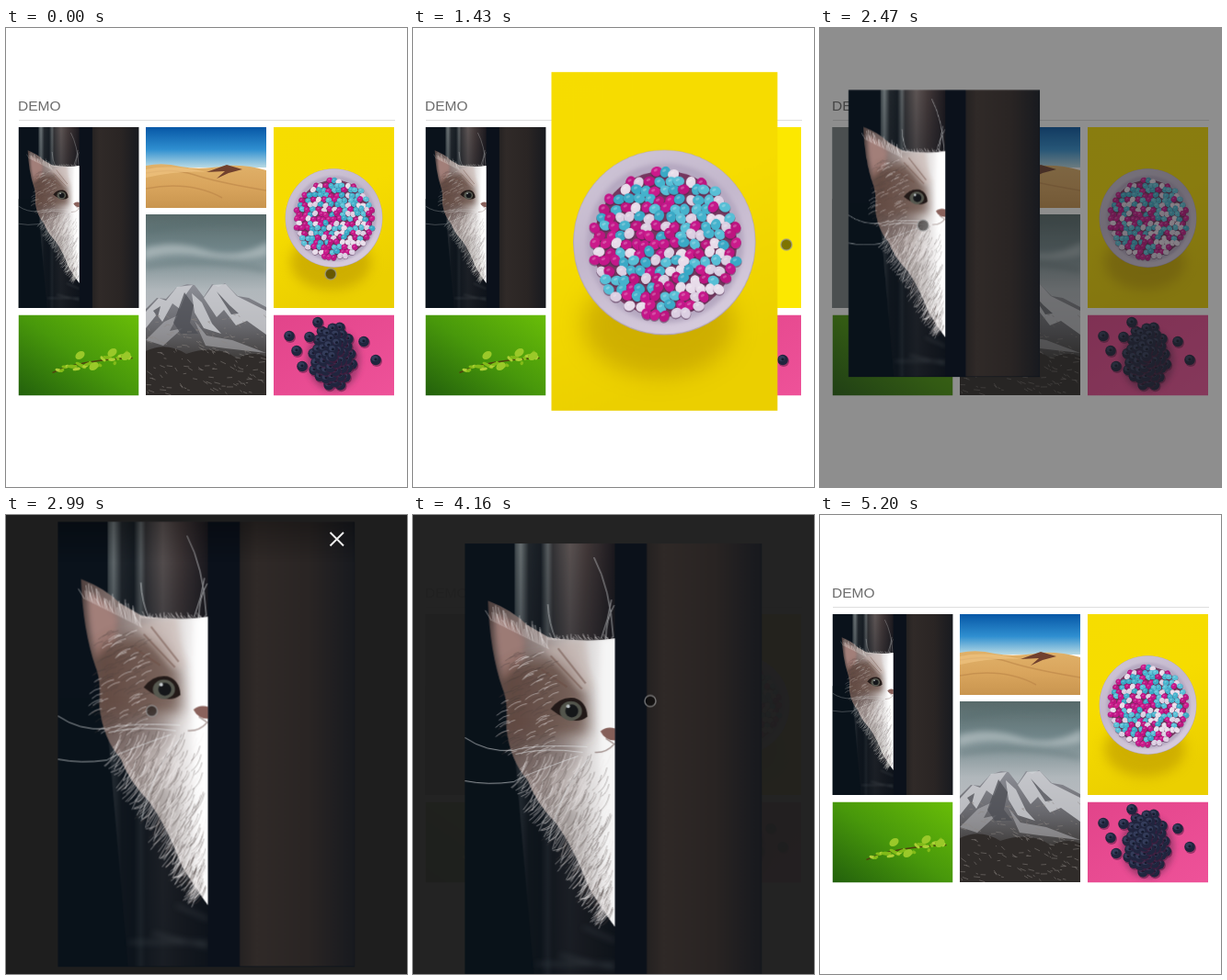
Animation, 436 px wide and 500 px high, one loop 5460 ms. Source, as an HTML page:

```html
<!DOCTYPE html>
<html lang="en">
<head>
<meta charset="utf-8">
<title>Demo gallery</title>
<style>
html, body { margin: 0; width: 100%; height: 100%; overflow: hidden; background: #fff; }
#stage { display: block; width: 436px; height: 500px; }
#stage text { font: 15.5px "Liberation Sans", Arial, sans-serif; fill: #6c6c6c; }

/* One loop is 42 ticks of 130 ms; one tick is 2.381 %. */
.anim { animation: 5460ms step-end infinite both; transform-origin: 56.5px 7.5px; }
.bowl-shown { animation-name: bowl-shown; }
.cat-shown { animation-name: cat-shown; }
.bowl-zoom { animation-name: bowl-zoom; }
.cat-zoom { animation-name: cat-zoom; }
.backdrop { animation-name: backdrop; }
.toolbar { animation-name: toolbar; }
.pointer { animation-name: pointer; transform-origin: 0 0; }

@keyframes bowl-shown { 0% { opacity: 0 } 4.76% { opacity: 1 } 30.95%, 100% { opacity: 0 } }
@keyframes cat-shown { 0% { opacity: 0 } 45.23% { opacity: 1 } 92.85%, 100% { opacity: 0 } }
@keyframes bowl-zoom {
  0% { transform: translate(234.5px, 100.5px) scale(.407) }
  4.76% { transform: translate(141px, 60px) scale(.644) }
  7.14% { transform: translate(35px, 15px) scale(.911) }
  9.52% { transform: none }
  26.19% { transform: translate(94px, 40.5px) scale(.762) }
  28.57% { transform: translate(199px, 85px) scale(.496) }
  30.95%, 100% { transform: translate(234.5px, 100.5px) scale(.407) }
}
@keyframes cat-zoom {
  0% { transform: translate(-43px, 100.5px) scale(.407) }
  45.23% { transform: translate(-25.5px, 60px) scale(.645) }
  47.61% { transform: translate(-7px, 15px) scale(.911) }
  49.99% { transform: translate(0, 0) scale(1) }
  73.8% { transform: translate(0, 0) scale(1); opacity: 1; animation-timing-function: steps(5) }
  85.71% { transform: translate(0, 118px) scale(1); opacity: .82 }
  88.09% { transform: translate(-18px, 111px) scale(.763); opacity: .9 }
  90.47% { transform: translate(-37px, 103px) scale(.496); opacity: 1 }
  92.85%, 100% { transform: translate(-43px, 100.5px) scale(.407); opacity: 1 }
}
@keyframes backdrop {
  0% { opacity: 0 }
  45.23% { opacity: .5 }
  47.61% { opacity: .92 }
  49.99% { opacity: 1 }
  73.8% { opacity: 1; animation-timing-function: steps(5) }
  85.71% { opacity: .88 }
  88.09% { opacity: .5 }
  90.47% { opacity: .15 }
  92.85% { opacity: .03 }
  95.23%, 100% { opacity: 0 }
}
@keyframes toolbar {
  0% { opacity: 0 } 9.52% { opacity: 1 } 26.19% { opacity: 0 }
  49.99% { opacity: 1 } 76.19%, 100% { opacity: 0 }
}
@keyframes pointer {
  0% { transform: translate(353px, 268px); opacity: 1 }
  4.76% { transform: translate(353px, 268px); animation-timing-function: steps(2) }
  9.52% { transform: translate(375px, 252px); animation-timing-function: steps(3) }
  16.66% { transform: translate(406px, 236px) }
  26.19% { transform: translate(406px, 236px); animation-timing-function: steps(6) }
  40.47% { transform: translate(112px, 215px) }
  47.61% { transform: translate(112px, 215px); animation-timing-function: steps(8) }
  66.66% { transform: translate(236px, 211px); animation-timing-function: steps(2) }
  71.42% { transform: translate(258px, 179px) }
  73.8% { transform: translate(258px, 179px); animation-timing-function: steps(5) }
  85.71% { transform: translate(258px, 297px); opacity: 1 }
  95.23%, 100% { transform: translate(258px, 297px); opacity: 0 }
}
</style>
</head>
<body>
<svg id="stage" viewBox="0 0 436 500" width="436" height="500">
  <defs>
    <filter id="mist" x="-30%" y="-60%" width="160%" height="220%"><feGaussianBlur stdDeviation="3"/></filter>
    <filter id="soft" x="-40%" y="-40%" width="180%" height="180%"><feGaussianBlur stdDeviation="8"/></filter>
    <filter id="softer" x="-40%" y="-60%" width="180%" height="220%"><feGaussianBlur stdDeviation="16"/></filter>
    <linearGradient id="yellow" x2=".3" y2="1">
      <stop stop-color="#f6dd00"/><stop offset=".5" stop-color="#f6dc00"/><stop offset="1" stop-color="#ebcf00"/>
    </linearGradient>
    <linearGradient id="china" x2=".5" y2="1">
      <stop stop-color="#d0c7d8"/><stop offset=".5" stop-color="#c4b8cd"/><stop offset="1" stop-color="#d5cadc"/>
    </linearGradient>
    <linearGradient id="door">
      <stop stop-color="#252222"/><stop offset=".15" stop-color="#302a28"/>
      <stop offset=".6" stop-color="#2a2524"/><stop offset="1" stop-color="#181a1f"/>
    </linearGradient>
    <linearGradient id="frame">
      <stop stop-color="#454e52"/><stop offset=".06" stop-color="#7c8486"/><stop offset=".14" stop-color="#262b30"/>
      <stop offset=".26" stop-color="#1a2026"/><stop offset=".33" stop-color="#6b7072"/><stop offset=".38" stop-color="#3c3a3c"/>
      <stop offset=".55" stop-color="#6c615f"/><stop offset=".72" stop-color="#4d403f"/><stop offset="1" stop-color="#1e1a1f"/>
    </linearGradient>
    <linearGradient id="dusk" x2="0" y2="1">
      <stop stop-color="#0b121a" stop-opacity=".15"/><stop offset=".25" stop-color="#0b121a" stop-opacity=".45"/>
      <stop offset=".55" stop-color="#0b121a" stop-opacity=".8"/><stop offset="1" stop-color="#0b121a" stop-opacity=".85"/>
    </linearGradient>
    <linearGradient id="fur">
      <stop stop-color="#4f403e"/><stop offset=".3" stop-color="#8b7b78"/><stop offset=".6" stop-color="#c2b9b7"/>
      <stop offset=".85" stop-color="#eeecec"/><stop offset="1" stop-color="#fff"/>
    </linearGradient>
    <linearGradient id="sky" x2="0" y2="1">
      <stop stop-color="#0757a6"/><stop offset=".55" stop-color="#2f8fd0"/><stop offset="1" stop-color="#b9dae4"/>
    </linearGradient>
    <linearGradient id="sand" x2="0" y2="1">
      <stop stop-color="#e0b169"/><stop offset=".5" stop-color="#d9a55d"/><stop offset="1" stop-color="#c9954f"/>
    </linearGradient>
    <linearGradient id="cloudy" x2="0" y2="1">
      <stop stop-color="#586a6a"/><stop offset=".35" stop-color="#71868a"/><stop offset=".75" stop-color="#b0b7bb"/><stop offset="1" stop-color="#b9bbc0"/>
    </linearGradient>
    <linearGradient id="rock" x2="0" y2="1">
      <stop stop-color="#8e9098"/><stop offset=".4" stop-color="#66666b"/><stop offset=".7" stop-color="#3c3937"/><stop offset="1" stop-color="#282525"/>
    </linearGradient>
    <linearGradient id="meadow" x1="1" y1="0" x2="0" y2="1">
      <stop stop-color="#69bd08"/><stop offset=".5" stop-color="#48980b"/><stop offset="1" stop-color="#22600c"/>
    </linearGradient>
    <linearGradient id="pink" x2="1" y2="1"><stop stop-color="#e2448a"/><stop offset="1" stop-color="#ee5299"/></linearGradient>
    <linearGradient id="shade" x2="0" y2="1"><stop stop-opacity=".3"/><stop offset="1" stop-opacity="0"/></linearGradient>
    <clipPath id="head">
      <path id="head-shape" d="M82 70Q108 80 124 96L148 110Q190 116 220 111V425Q207 407 192 383Q176 340 156 312Q134 290 125 265Q106 244 102 208Q104 180 98 166Q84 126 82 70Z"/>
    </clipPath>

    <symbol id="bowl" viewBox="57 8 322 483" preserveAspectRatio="none">
      <rect x="57" y="8" width="322" height="483" fill="url(#yellow)"/>
      <ellipse cx="210" cy="368" rx="108" ry="74" fill="#b08c00" opacity=".5" filter="url(#softer)"/>
      <ellipse cx="218" cy="251" rx="130" ry="132" fill="#b3a6be"/>
      <ellipse cx="218" cy="250.5" rx="129" ry="131" fill="url(#china)"/>
      <ellipse cx="219" cy="252" rx="112" ry="114" fill="#b6a9c1" filter="url(#mist)"/>
      <ellipse cx="219" cy="253" rx="102" ry="104" fill="#75385f"/>
      <g id="candies"/>
    </symbol>

    <symbol id="cat" viewBox="57 8 322 483" preserveAspectRatio="none">
      <rect x="57" y="8" width="322" height="483" fill="#0a121b"/>
      <rect x="111" y="8" width="109" height="483" fill="url(#frame)"/>
      <rect x="111" y="8" width="109" height="483" fill="url(#dusk)"/>
      <path d="M108 200L133 491H57V200Z" fill="#09121a"/>
      <path d="M135 465H220M186 425L220 440M160 455L220 470" fill="none" stroke="#50565b" stroke-width="3" opacity=".45" filter="url(#mist)"/>
      <rect x="254" y="8" width="125" height="483" fill="url(#door)"/>
      <use href="#head-shape" fill="url(#fur)"/>
      <g clip-path="url(#head)">
        <path d="M89 84Q112 92 122 112L119 140L99 158Q88 121 89 84Z" fill="#a27f79" filter="url(#mist)"/>
        <path d="M96 150Q140 118 172 142L190 172L192 215L150 222L100 240Z" fill="#5d4237" opacity=".75" filter="url(#soft)"/>
        <path d="M100 215Q150 212 184 230L170 250L110 262Z" fill="#6b5a56" opacity=".55" filter="url(#soft)"/>
        <path d="M142 122L186 112L196 168L180 166Z" fill="#cbb9b3" opacity=".55" filter="url(#mist)"/>
        <path d="M140 280L185 300L195 360L210 420L150 330Z" fill="#8d8785" opacity=".4" filter="url(#soft)"/>
        <path d="M205 111H222V425H212Q200 250 205 111Z" fill="#fff" opacity=".85" filter="url(#mist)"/>
        <path d="M150 130L184 166M158 122L188 160M140 145L168 164" stroke="#6f4f44" stroke-width="2" fill="none" opacity=".5"/>
      </g>
      <path id="fur-dark" stroke="#4d413f" stroke-width=".9" fill="none" opacity=".4"/>
      <path id="fur-light" stroke="#f4f1f0" stroke-width=".9" fill="none" opacity=".55"/>
      <path d="M150 188Q160 174 176 176Q189 180 190 196Q175 208 150 188Z" fill="#231a18"/>
      <ellipse cx="172" cy="190" rx="12" ry="10.5" fill="#56584f"/>
      <circle cx="173" cy="190" r="7" fill="#15171a"/>
      <circle cx="169" cy="185" r="2" fill="#c3c9cc"/>
      <path d="M204 212Q211 206 220 209V222Q209 222 204 212Z" fill="#8a625c"/>
      <path d="M210 220L219 226Q210 236 198 235" fill="none" stroke="#8b7570" stroke-width="1.5" opacity=".7"/>
      <g fill="none" stroke="#edf0f2" stroke-width=".9" opacity=".7">
        <path d="M190 229Q130 226 109 233Q80 235 57 219M185 235Q142 229 112 237M180 239Q120 260 110 267Q82 271 57 266M192 241Q160 275 148 331"/>
        <path d="M197 23Q215 57 218 110M216 69Q213 90 205 111M219 75Q210 91 210 112M147 74Q148 95 156 113"/>
      </g>
      <rect x="220" y="8" width="34" height="483" fill="#0b111b"/>
    </symbol>
  </defs>

  <rect width="436" height="500" fill="#fff"/>
  <text x="13" y="90">DEMO</text>
  <path d="M14 100.5H423" stroke="#dedede"/>

  <use href="#cat" x="13.5" y="108" width="131" height="197"/>
  <use href="#bowl" x="291" y="108" width="131" height="197"/>

  <svg x="152" y="108" width="131" height="88" viewBox="152 108 131 88">
    <rect x="152" y="108" width="131" height="44" fill="url(#sky)"/>
    <path d="M152 150Q171 146 190 151Q210 155 240 150Q263 149 283 155V196H152Z" fill="url(#sand)"/>
    <path d="M218 157L240 149L257 154L242 158L229 164L238 156Z" fill="#71412e"/>
    <path d="M152 158Q181 152 205 160T283 177M152 175Q200 166 235 185" fill="none" stroke="#b98245" stroke-width="1.5" opacity=".55"/>
    <path d="M152 154Q180 148 218 157Q190 155 152 163Z" fill="#efc480" opacity=".7"/>
  </svg>

  <svg x="152" y="203" width="131" height="197" viewBox="152 203 131 197">
    <rect x="152" y="203" width="131" height="110" fill="url(#cloudy)"/>
    <path d="M150 240Q184 230 217 242T285 233V248Q248 255 215 249T150 252Z" fill="#c3ccce" opacity=".6" filter="url(#mist)"/>
    <path d="M152 221Q210 208 283 214M152 260Q218 249 283 264" fill="none" stroke="#536b6d" stroke-width="5" opacity=".4" filter="url(#mist)"/>
    <path d="M152 306L164 294L174 295L185 283L197 279L205 280L215 293L224 279L231 282L238 278L252 292L264 294L283 304V400H152Z" fill="url(#rock)"/>
    <path d="M152 309L166 294L174 297L186 282L203 280L195 291L189 306L181 300L170 320L164 312L152 327ZM215 294L225 280L239 279L251 292L283 308V334L262 319L250 324L237 307L229 315ZM202 289L213 299L224 322L234 333L215 327L205 310Z" fill="#d7d8dc" opacity=".75"/>
    <path d="M152 340L172 320L187 313L178 330L192 327L171 346ZM205 319L218 335L246 340L283 354L239 349L217 346Z" fill="#c0c0c3" opacity=".5"/>
    <path d="M194 288L204 302L200 321L209 333L190 333L182 321ZM229 287L243 302L253 311L245 312ZM160 308L168 303L165 315Z" fill="#4d4e54" opacity=".75"/>
    <path d="M152 352Q174 341 196 355Q229 344 251 360Q270 351 283 358V400H152Z" fill="#302c2a"/>
    <path id="scree" fill="none" stroke="#8b8682" stroke-width="1" opacity=".5"/>
  </svg>

  <svg x="13.5" y="312.5" width="131" height="88" viewBox="13 312 131 88">
    <rect x="13" y="312" width="131" height="88" fill="url(#meadow)"/>
    <path d="M50 375Q80 361 137 359" fill="none" stroke="#51430f" stroke-width="1.5"/>
    <g id="leaves"/>
  </svg>

  <svg x="291" y="312.5" width="131" height="88" viewBox="291 312 131 88">
    <rect x="291" y="312" width="131" height="88" fill="url(#pink)"/>
    <ellipse cx="356" cy="361" rx="29" ry="34" fill="#742e58" opacity=".6" filter="url(#mist)"/>
    <g id="berries"/>
  </svg>

  <rect class="anim bowl-shown" x="291" y="108" width="131" height="197" fill="#fce800"/>
  <rect class="anim cat-shown" x="13.5" y="108" width="131" height="197" fill="#788084"/>
  <rect class="anim backdrop" width="436" height="500" fill="#1e1e1e"/>

  <g class="anim bowl-shown"><g class="anim bowl-zoom"><use href="#bowl" x="56.5" y="7.5" width="322.5" height="484"/></g></g>
  <g class="anim cat-shown"><g class="anim cat-zoom"><use href="#cat" x="56.5" y="7.5" width="322.5" height="484"/></g></g>

  <g class="anim toolbar">
    <rect x="56.5" y="7.5" width="322.5" height="44" fill="url(#shade)"/>
    <path d="M352.5 19L367 33.5M367 19L352.5 33.5" stroke="#fff" stroke-width="2" opacity=".92"/>
  </g>
  <g class="anim pointer">
    <circle r="6" fill="#000" fill-opacity=".5" stroke="#999" stroke-opacity=".7" stroke-width="1.5"/>
  </g>
</svg>

<script>
let seed = 17;
const random = () => (seed = (seed * 16807) % 2147483647) / 2147483647;
const between = (low, high) => low + (high - low) * random();
const find = id => document.getElementById(id);

function add(parent, tag, attributes) {
  const node = document.createElementNS(parent.namespaceURI, tag);
  for (const [name, value] of Object.entries(attributes)) node.setAttribute(name, value);
  parent.append(node);
}

function ellipse(parent, x, y, rx, ry, angle, fill, opacity = 1) {
  add(parent, 'ellipse', { rx, ry, fill, opacity, transform: `translate(${x} ${y}) rotate(${angle})` });
}

function fillBowl() {
  const candies = find('candies');
  const tones = ['#bd1580', '#cb1a8b', '#c4178a', '#45b3cd', '#58bfd6', '#3aa9c6', '#dccfe2', '#e8dcea'];
  for (let row = -8; row <= 8; row++) {
    for (let column = -8; column <= 8; column++) {
      const dx = column * 14.2 + (row & 1) * 7.1 + between(-2.5, 2.5);
      const dy = row * 12.6 + between(-2.5, 2.5);
      if (Math.hypot(dx, dy) > 104) continue;
      const x = 219 + dx, y = 253 + dy, angle = between(-80, 80);
      const tone = tones[Math.floor(random() * tones.length)];
      ellipse(candies, x, y + 1.5, 8.4, 7.4, angle, '#4a2145', .5);
      ellipse(candies, x, y, 8.2, 7, angle, tone);
      ellipse(candies, x - 1.5, y - 2, 3, 1.8, -25, '#fff', .25);
    }
  }
}

// Hair runs outward and down from the lit edge of the door.
function growFur() {
  let light = '', dark = '';
  for (let i = 0; i < 420; i++) {
    const y = between(235, 405);
    const edge = 112 + (y - 235) * .56;
    const x = between(edge, 218), drop = between(8, 24);
    const hair = `M${x} ${y}q${-drop * .15} ${drop * .7} ${-drop * .6} ${drop}`;
    if (i % 2) light += hair; else dark += hair;
  }
  for (let i = 0; i < 150; i++) {
    const x = between(103, 160), y = between(125, 235), length = between(6, 15);
    const hair = `M${x} ${y}q${-length * .6} ${length * .1} ${-length} ${length * .5}`;
    if (i % 3) dark += hair; else light += hair;
  }
  for (let i = 0; i < 70; i++) {
    const k = i / 70;
    light += `M${124 + k * 90} ${255 + k * 155}q-4 8 ${-between(6, 18)} ${between(8, 24)}`;
  }
  for (let i = 0; i < 32; i++) {
    light += `M${86 + i * 2} ${92 + i}l${between(-9, 1)} ${-between(8, 22)}`;
    light += `M${148 + i * 2.2} 113l${between(-5, 1)} ${-between(2, 8)}`;
  }
  find('fur-light').setAttribute('d', light);
  find('fur-dark').setAttribute('d', dark);
}

function scatterScree() {
  let path = '';
  for (let i = 0; i < 150; i++) {
    path += `M${between(152, 281)} ${between(312, 398)}l${between(1, 7)} ${between(-1, 4)}`;
  }
  find('scree').setAttribute('d', path);
}

function growLeaves() {
  for (let i = 0; i < 25; i++) {
    const x = 57 + i * 3.2, y = 373 - i * .65 + between(-5, 4);
    ellipse(find('leaves'), x, y, between(2, 5), 1.7, between(-60, 60), i % 3 ? '#82bb18' : '#adcf35');
  }
  for (const [x, y] of [[80, 356], [95, 368], [115, 353], [130, 357]]) {
    ellipse(find('leaves'), x, y, 5.5, 4, -35, '#9ac929');
  }
}

function pileBerries() {
  const berries = find('berries');
  const berry = (x, y) => {
    ellipse(berries, x + 1, y + 1.5, 6, 6, 0, '#4d183d', .5);
    ellipse(berries, x, y, 5.8, 5.8, 0, '#20253e');
    ellipse(berries, x - 1, y - 1.4, 3.4, 3, 0, '#3a4362', .8);
    ellipse(berries, x, y - .5, 1.6, 1.4, 0, '#151a2d');
  };
  for (let i = 46; i--;) {
    const reach = Math.sqrt(i / 46), angle = i * 2.4;
    berry(355 + 23 * reach * Math.cos(angle), 357 + 34 * reach * Math.sin(angle));
  }
  [[308, 335], [316, 351], [322, 368], [389, 341], [402, 361], [339, 320], [330, 336]].forEach(([x, y]) => berry(x, y));
}

fillBowl();
growFur();
scatterScree();
growLeaves();
pileBerries();
</script>
</body>
</html>
```
